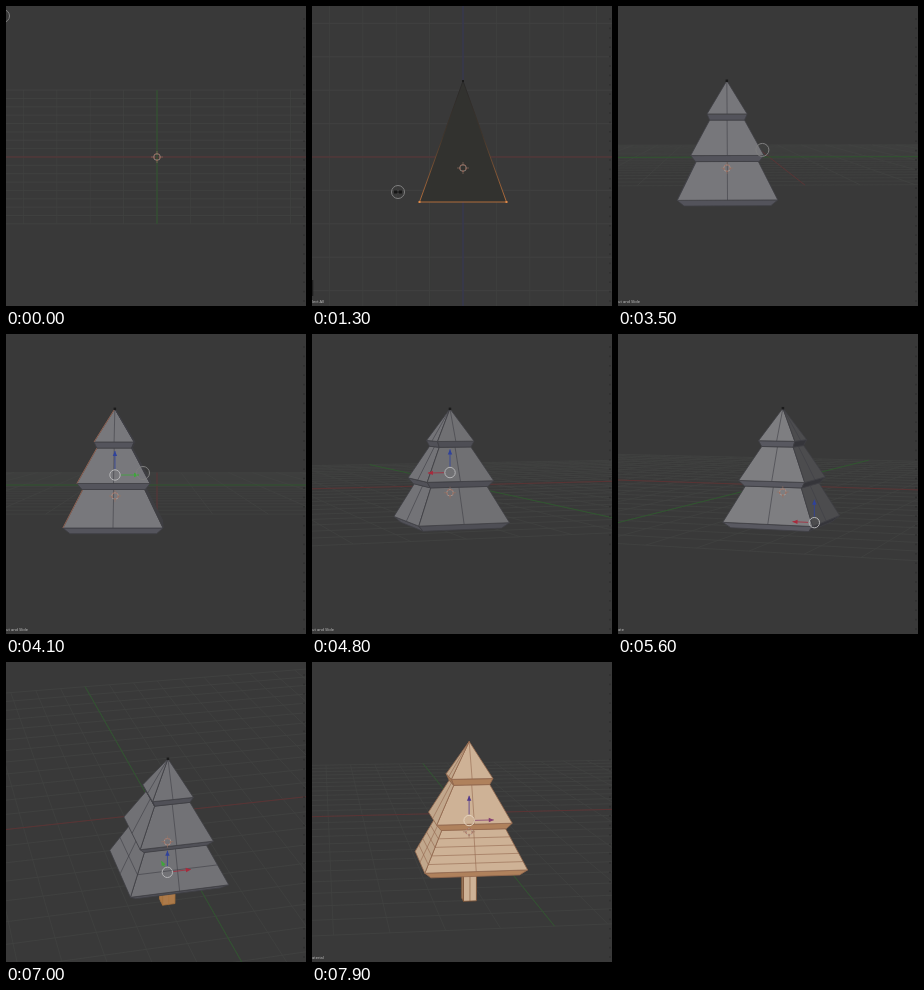
Recreate the animation shown at these times as an HTML page with a canvas. Size 300 by 300 pixels, loop 8 s.

```html
<!DOCTYPE html>
<html lang="en">
<head>
<meta charset="utf-8">
<title>Low-poly tree modelling</title>
<style>
  html, body { margin: 0; width: 100%; height: 100%; overflow: hidden; background: #393939; }
  canvas { display: block; }
</style>
</head>
<body>
<canvas id="stage" width="300" height="300"></canvas>
<script>
const ctx = document.getElementById('stage').getContext('2d');
const LOOP = 8000, STEP = 100;
const CENTER = 151, UNIT = 33.4, SETBACK = 42;
const DRAFT = 700, SOLID = 1800, ORBIT = 2700, TRUNK = 6300, SELECTED = 7300;

// time, yaw, pitch: the camera circles the world origin once
const VIEW = [
  [0, 0, 14.5], [600, 0, 0], [ORBIT, 0, 0], [3600, -90, 2.5], [4200, -90, 2.5],
  [5200, -200, 5.2], [5800, -200, 5.2], [7000, -346, 26], [SELECTED, -352, 10]
];
const MOUSE = [[0, -3, 10], [1300, 86, 186], [2600, 158, 153], [4100, 137, 139]];
// start, position in the tree's own space
const GIZMO = [[3600, 0, 0, 10], [5000, -31, -11, -43], [6000, 0, 0, -45], [7200, 0, 0, 0]];
const STATUS = [[1000, 'lect All'], [SOLID, 'ut and Slide'], [5000, 'ate'], [TRUNK, ''], [SELECTED, 'aterial']];

const mix = (a, b, k) => a + (b - a) * k;
const midpoint = (a, b) => a.map((v, i) => (v + b[i]) / 2);
const current = (list, t) => list.filter(e => e[0] <= t).pop();
const ramp = (t, a, b) => {
  const k = Math.min(1, Math.max(0, (t - a) / (b - a)));
  return k * k * (3 - 2 * k);
};

function sample(keys, t) {
  const next = keys.findIndex(k => k[0] > t);
  if (next < 0) return keys[keys.length - 1].slice(1);
  const a = keys[next - 1], b = keys[next], k = ramp(t, a[0], b[0]);
  return a.slice(1).map((v, i) => mix(v, b[i + 1], k));
}

function path(points, closed) {
  ctx.beginPath();
  points.forEach(p => ctx.lineTo(...p));
  if (closed) ctx.closePath();
}
function line(points, color, width = 1) {
  path(points);
  ctx.strokeStyle = color;
  ctx.lineWidth = width;
  ctx.stroke();
}
function polygon(points, fill, stroke, width = .8) {
  path(points, true);
  ctx.fillStyle = fill;
  ctx.fill();
  if (!stroke) return;
  ctx.strokeStyle = stroke;
  ctx.lineWidth = width;
  ctx.stroke();
}
function ring(x, y, r, color, width = 1) {
  ctx.beginPath();
  ctx.arc(x, y, r, 0, 7);
  ctx.strokeStyle = color;
  ctx.lineWidth = width;
  ctx.stroke();
}
function dot(x, y, size, color) {
  ctx.fillStyle = color;
  ctx.fillRect(x - size / 2, y - size / 2, size, size);
}

function camera(t) {
  const [yaw, pitch] = sample(VIEW, t);
  const a = yaw * Math.PI / 180, p = pitch * Math.PI / 180;
  const ca = Math.cos(a), sa = Math.sin(a), cp = Math.cos(p), sp = Math.sin(p);
  const persp = .001 * ramp(t, ORBIT, 3100);
  const world = (x, y, z) => {
    const far = x * sa + y * ca;
    const k = 1 / (1 + (far * cp - z * sp) * persp);
    return [CENTER + (x * ca - y * sa) * k, CENTER - (z * cp + far * sp) * k];
  };
  // Light comes from the viewer's left
  const shade = (nx, ny) => .66 - .34 * (.87 * (nx * sa + ny * ca) + .5 * (nx * ca - ny * sa));
  return { world, shade, flat: pitch < .3, tree: (x, y, z) => world(x, y - SETBACK, z) };
}

function drawGrid(t, cam) {
  const P = cam.world;
  const n = t < ORBIT ? 8 : 12, e = n * UNIT;
  for (let i = -n; i <= n; i++) {
    const d = i * UNIT;
    if (cam.flat) line([P(-e, 0, d), P(e, 0, d)], '#404040');
    else line([P(-e, d, 0), P(e, d, 0)], '#424342', .8);
    const ends = cam.flat ? [P(d, 0, -e), P(d, 0, e)] : [P(d, -e, 0), P(d, e, 0)];
    line(ends, '#414241', .8);
  }
  line([P(-e, 0, 0), P(e, 0, 0)], '#5a3334');
  if (cam.flat) line([P(0, 0, -e), P(0, 0, e)], '#343458');
  else line([P(0, -e, 0), P(0, e, 0)], '#30562f');
}

function drawDraft(t, cam) {
  const top = 43.5 * (1 - ramp(t, 850, 1200));
  const at = (x, z) => cam.tree(x, 0, z);
  const shape = [at(-top, 76), at(top, 76), at(43.5, -45), at(-43.5, -45)];
  const edge = ctx.createLinearGradient(0, 75, 0, 196);
  edge.addColorStop(0, '#292929');
  edge.addColorStop(.45, '#3f352c');
  edge.addColorStop(1, '#b06c3b');
  polygon(shape, '#32322f', edge, 1);
  if (t >= 1500) line([at(-13, 37), at(13, 37)], '#8d6a3c');
  if (t >= 1600) line([at(-27, -3), at(27, -3)], '#8d6a3c');
  shape.forEach((p, i) => dot(...p, 2, i < 2 ? '#1c1c1c' : '#e08a48'));
}

// Unit square, seen from the front: left, right, back right, back left
const CORNERS = [[-1, -1], [1, -1], [1, 1], [-1, 1]];

// Four sides between two square rings given as [z, half width]
function drawSides(cam, depth, upper, lower, rgb, edge, cuts = 0, middle = true) {
  const corner = ([z, h], i) => {
    const [x, y] = CORNERS[i % 4];
    return cam.tree(x * h, y * h * depth, z);
  };
  for (let i = 0; i < 4; i++) {
    const q = [corner(upper, i), corner(upper, i + 1), corner(lower, i + 1), corner(lower, i)];
    const area = q.reduce((s, p, j) => {
      const r = q[(j + 1) % 4];
      return s + p[0] * r[1] - r[0] * p[1];
    }, 0);
    if (area < 1) continue;
    const k = cam.shade(...midpoint(CORNERS[i], CORNERS[(i + 1) % 4]));
    polygon(q, `rgb(${rgb.map(v => Math.round(v * k))})`, edge);
    if (middle) line([midpoint(q[0], q[1]), midpoint(q[2], q[3])], edge, .6);
    for (let c = 1; c <= cuts; c++) {
      const at = [0, 1].map(j => mix(upper[j], lower[j], c / (cuts + 1)));
      line([corner(at, i), corner(at, i + 1)], edge, .6);
    }
  }
}

function drawTree(t, cam) {
  const depth = ramp(t, ORBIT, 3500), picked = t >= SELECTED, P = cam.tree;
  const body = picked ? [222, 192, 161] : [126, 126, 130];
  const lip = picked ? [188, 139, 99] : [88, 88, 96];
  const wood = picked ? body : [190, 135, 82];
  const edge = picked ? '#94694f' : depth ? '#3f3f45' : '#77777a';

  if (t >= TRUNK) {
    const bottom = mix(-46, -78, ramp(t, TRUNK, 6900));
    drawSides(cam, 1, [-42, 6.3], [bottom, 6.3], wood, picked ? '#805638' : '#a8713a');
  }
  const tiers = [
    [-3, mix(27.3, 30, depth), -45, mix(42, 47.8, depth)],
    [37, mix(13.2, 17, depth), -3, mix(27.3, 35.3, ramp(t, 2200, 2550))],
    [76, 0, 37, mix(13.2, 19.6, ramp(t, 1850, 2150))]
  ];
  tiers.forEach(([zTop, hTop, zLow, hLow], i) => {
    const rim = [zLow + 6 * depth, hLow];
    const cuts = i || t < 6000 ? 0 : picked ? 4 : 1;
    drawSides(cam, depth, rim, [zLow, hLow * (1 - .13 * depth)], lip, edge, 0, false);
    drawSides(cam, depth, [zTop, hTop], rim, body, edge, cuts, depth > 0);
    if (t >= 3600 && t < 4300)
      line([P(hTop, -hTop, zTop), P(hLow, -hLow, rim[0])], '#976653', .9);
  });
  if (t >= 2200 && t < ORBIT) line([P(-tiers[1][3], 0, -3), P(2, 0, -3)], '#cf8648');
  if (depth && !picked) dot(...P(0, 0, 76), 2.5, '#1b1b1b');
}

function drawCursor(x, y) {
  ring(x, y, 3.3, '#b5a59b', .7);
  ctx.setLineDash([2, 2]);
  ring(x, y, 3.3, '#a0503f', .7);
  ctx.setLineDash([]);
  for (const [dx, dy] of [[1, 0], [-1, 0], [0, 1], [0, -1]])
    line([[x + dx * 2, y + dy * 2], [x + dx * 6, y + dy * 6]], '#987262', .6);
}

function drawGizmo(t, cam) {
  const mode = current(GIZMO, t);
  if (!mode) return;
  const picked = t >= SELECTED, [, x, y, z] = mode, o = cam.tree(x, y, z);
  const arrow = (dx, dy, dz, color) => {
    const tip = cam.tree(x + dx * 24, y + dy * 24, z + dz * 24);
    const vx = tip[0] - o[0], vy = tip[1] - o[1], len = Math.hypot(vx, vy);
    if (len < 8) return;
    const ux = vx / len, uy = vy / len;
    const along = (d, side) => [o[0] + ux * d - uy * side, o[1] + uy * d + ux * side];
    line([along(6, 0), tip], color, .8);
    polygon([tip, along(len - 5, 2.2), along(len - 5, -2.2)], color);
  };
  arrow(1, 0, 0, picked ? '#843f72' : '#a82a3c');
  arrow(0, 1, 0, '#3ea63a');
  arrow(0, 0, 1, picked ? '#4f378c' : '#2f429c');
  ring(...o, 5.2, picked ? '#e5d4bf' : '#b4b4b6');
}

function drawMouse(t) {
  if (t > 4500) return;
  const [x, y] = sample(MOUSE, t);
  ring(x, y, 6.5, '#808080');
  if (t < 1000 || t > 3000) return;
  dot(x - 2.5, y, 3, '#171717');
  dot(x + 2.5, y, 3, '#171717');
  line([[x - 3, y], [x + 3, y]], '#171717');
}

function drawChrome(t) {
  for (let y = 13; y < 300; y += 9.4) dot(298, y, 1.6, '#303030');
  if (t >= 800 && t < ORBIT) line([[.5, 274], [.5, 290]], '#1d1d1d', 1.5);
  const status = current(STATUS, t);
  if (!status) return;
  ctx.font = '4px "Open Sans", sans-serif';
  ctx.fillStyle = '#c8c8c8';
  ctx.fillText(status[1], 0, 297);
}

function draw(t) {
  const cam = camera(t);
  ctx.fillStyle = '#393939';
  ctx.fillRect(0, 0, 300, 300);
  drawGrid(t, cam);
  if (t >= SOLID) drawTree(t, cam);
  else if (t >= DRAFT) drawDraft(t, cam);
  drawCursor(...(t < DRAFT ? cam.world(0, 0, 0) : cam.tree(0, 0, -11)));
  drawGizmo(t, cam);
  drawMouse(t);
  drawChrome(t);
}

function frame() {
  draw(Math.floor(performance.now() % LOOP / STEP) * STEP);
  requestAnimationFrame(frame);
}
frame();
</script>
</body>
</html>
```
